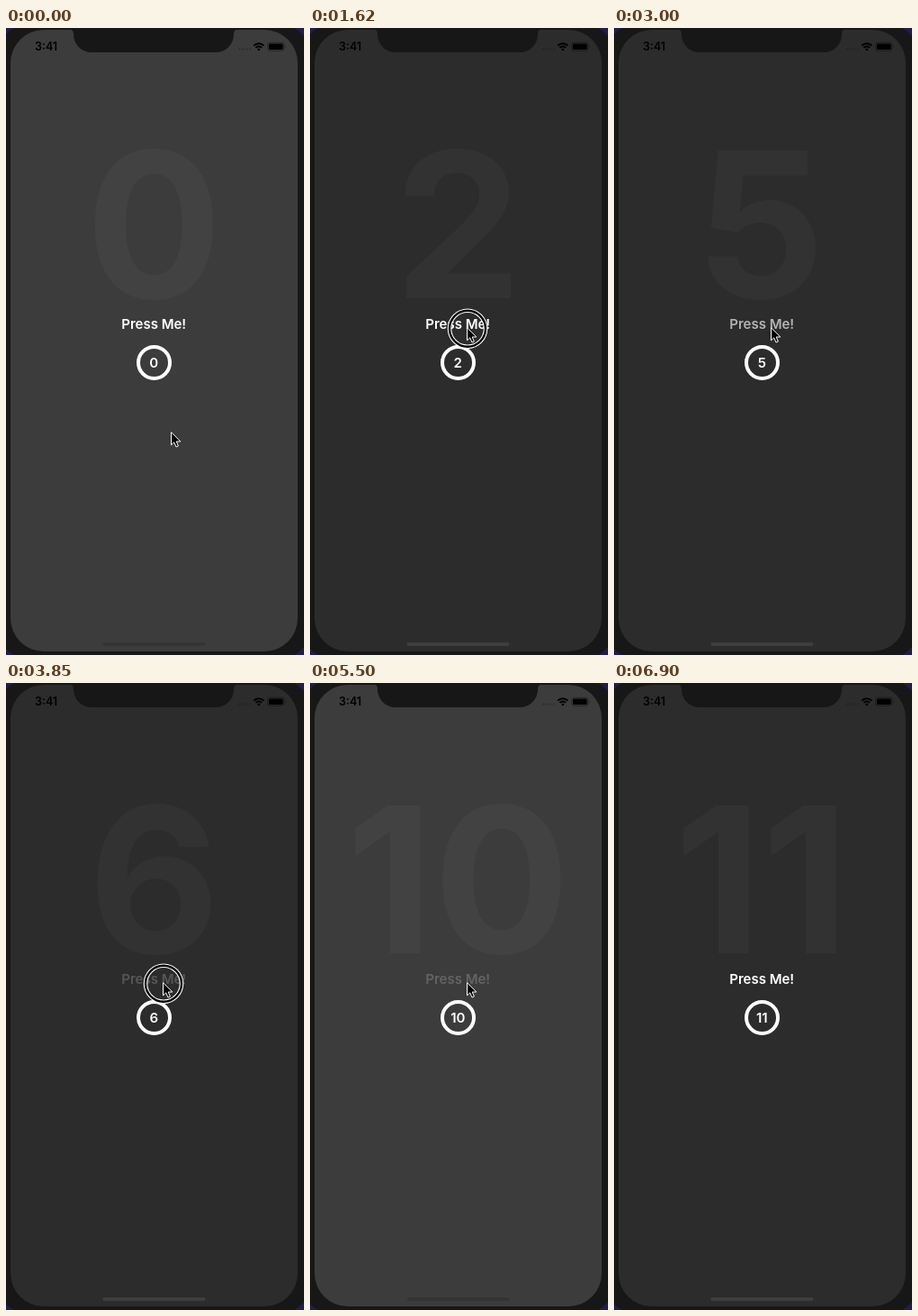
Recreate the animation shown at these times as an HTML page. Size 331 px wide and 696 px high, loop 8 s.

```html
<!DOCTYPE html>
<html lang="en">
<head>
<meta charset="utf-8">
<title>Press counter</title>
<style>
  html, body { margin: 0; height: 100%; overflow: hidden; background: #171717; }
  svg { display: block; width: 100vw; height: 100vh; }
  text { font-family: Inter, "Liberation Sans", sans-serif; font-weight: 600; }
  .mid { text-anchor: middle; fill: #fff; }
</style>
</head>
<body>
<svg viewBox="0 0 331 696">
  <!-- phone body and screen -->
  <rect width="331" height="696" fill="#221d4d"/>
  <rect x="-13" y="-6" width="355" height="708" rx="44" fill="#171717"/>
  <rect id="screen" x="5" y="2" width="319" height="690" rx="37"/>
  <path d="M71 1.5Q75 2 75 7A20 20 0 0 0 95 27H233A20 20 0 0 0 253 7Q253 2 257 1.5Z" fill="#171717"/>

  <!-- status bar -->
  <text x="32" y="25.3" font-size="12.5">3:41</text>
  <path d="M258.5 23.5H272" stroke="#000" stroke-width="2" stroke-dasharray="2 2" opacity=".22"/>
  <g fill="none" stroke="#000" stroke-width="2">
    <path d="M275.2 19.6A8 8 0 0 1 286.4 19.6M277.4 21.9A4.8 4.8 0 0 1 284.2 21.9"/>
    <path d="M279.1 23.7A2.4 2.4 0 0 1 282.5 23.7L280.8 25.6Z" fill="#000" stroke="none"/>
  </g>
  <rect x="290.8" y="16.3" width="18" height="9" rx="2.6" fill="none" stroke="#000" stroke-opacity=".4"/>
  <rect x="292" y="17.5" width="15.6" height="6.6" rx="1.4"/>
  <path d="M310 19.3Q311.4 20.8 310 22.3Z" opacity=".45"/>

  <!-- counter -->
  <text id="big" class="mid" x="164.3" y="300" font-size="225" style="font-weight:700" opacity=".027"></text>
  <text id="label" class="mid" x="164.2" y="333.5" font-size="15">Press Me!</text>
  <circle cx="164.5" cy="371.5" r="17.5" fill="none" stroke="#fff" stroke-width="4"/>
  <text id="small" class="mid" x="164.3" y="377" font-size="15"></text>
  <rect id="home" x="107.5" y="682" width="114" height="4" rx="2"/>

  <!-- pointer, tip at the origin -->
  <g id="pointer">
    <g id="ring" fill="none">
      <circle cx="1" cy="1.7" r="20" stroke="#fff" stroke-width="4.6"/>
      <circle cx="1" cy="1.7" r="20" stroke="#000" stroke-width="2.4"/>
    </g>
    <path d="M.5 .7V14.8L3.7 11.9L6 17L8.4 16L6.2 11H10.8Z" stroke="#fff"/>
  </g>
</svg>
<script>
const LOOP = 8000;
const downs = [440, 1070, 1620, 2150, 2720, 3230, 3750, 4250, 4800, 5350, 5900];
const presses = downs.map((down, i) => ({ down, up: down + (i < 10 ? 110 : 25) }));
const $ = id => document.getElementById(id);
const [screen, big, label, small, home, pointer, ring] =
  ['screen', 'big', 'label', 'small', 'home', 'pointer', 'ring'].map($);

const clamp = x => Math.min(1, Math.max(0, x));
const ease = x => x < .5 ? 2 * x * x : 1 - 2 * (1 - x) ** 2;

// dims shortly after the press, then fades back after the release
function labelOpacity(t, press) {
  if (!press || t < press.down + 30) return 1;
  return .2 + .8 * ease(clamp((t - press.up - 40) / 250));
}

function draw() {
  const t = performance.now() % LOOP;
  const press = presses.filter(p => t >= p.down).pop();
  const count = presses.filter(p => t >= p.up).length;
  const light = count % 10 === 0;

  screen.setAttribute('fill', light ? '#3c3c3c' : '#2c2c2c');
  home.setAttribute('fill', light ? '#343434' : '#3e3e3e');
  big.textContent = small.textContent = count;
  label.setAttribute('opacity', labelOpacity(t, press));

  const move = ease(clamp((t - 50) / 350));
  pointer.setAttribute('transform', `translate(${183 - 9 * move} ${448 - 116 * move})`);
  pointer.style.display = t < 6900 ? '' : 'none';
  ring.style.display = press && t < press.up ? '' : 'none';
  requestAnimationFrame(draw);
}
draw();
</script>
</body>
</html>
```
